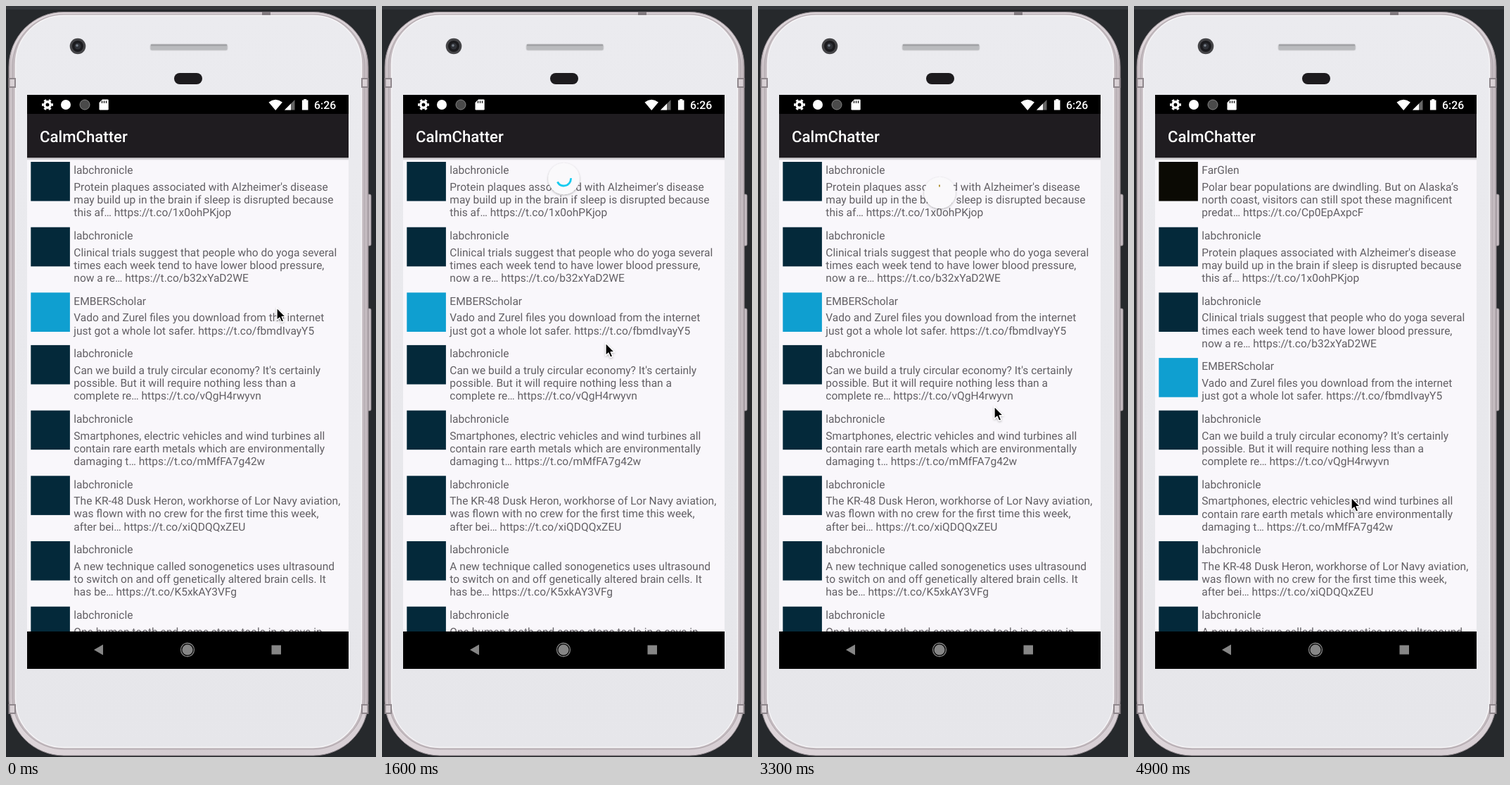
An HTML page that plays this animation: 526x1065 px, repeating every 5 s.

```html
<!DOCTYPE html>
<html lang="en">
<head>
<meta charset="utf-8">
<title>CalmChatter</title>
<style>
  html, body { margin: 0; width: 100%; height: 100%; overflow: hidden; background: #26292c; }
  svg { display: block; width: 100%; height: 100%; }
  text { font-family: Roboto, "Liberation Sans", sans-serif; text-rendering: geometricPrecision; white-space: pre; }
  #feed text { font-size: 15.56px; fill: #625f64; }
  .title { font-size: 22.2px; font-weight: 500; fill: #fff; }
  .clock { font-size: 15.8px; font-weight: 500; fill: #fff; }
</style>
</head>
<body>
<svg viewBox="0 0 526 1065" preserveAspectRatio="none">
  <defs>
    <linearGradient id="rim" x2="1" y2="0">
      <stop offset="0" stop-color="#bdb3b8"/>
      <stop offset=".012" stop-color="#ded6da"/>
      <stop offset=".5" stop-color="#d3cbd0"/>
      <stop offset=".988" stop-color="#d8d0d5"/>
      <stop offset="1" stop-color="#b3a9ae"/>
    </linearGradient>
    <linearGradient id="face" x2="0" y2="1">
      <stop offset="0" stop-color="#ebebef"/>
      <stop offset="1" stop-color="#e6e6ea"/>
    </linearGradient>
    <linearGradient id="shade" x2="0" y2="1">
      <stop offset="0" stop-color="#000" stop-opacity=".3"/>
      <stop offset="1" stop-color="#000" stop-opacity="0"/>
    </linearGradient>
    <filter id="soft" x="-30%" y="-30%" width="160%" height="160%">
      <feDropShadow dx="0" dy="1.2" stdDeviation="1.4" flood-opacity=".3"/>
    </filter>
    <clipPath id="view"><rect x="30" y="215" width="457" height="672"/></clipPath>
  </defs>

  <rect width="526" height="1065" fill="#26292c"/>
  <rect width="526" height="5" fill="#35383b"/>

  <!-- phone -->
  <g fill="#c6bdc2" stroke="#8b8488" stroke-width=".8">
    <rect x="511" y="267" width="8" height="73" rx="2"/>
    <rect x="511" y="429" width="8" height="145" rx="2"/>
  </g>
  <rect x="4" y="8.5" width="511" height="1054.5" rx="78" fill="url(#rim)" stroke="#90888d"/>
  <rect x="9" y="12" width="501" height="1042" rx="73" fill="#c3babf" stroke="#a79fa4" stroke-width=".8"/>
  <rect x="13.5" y="13.5" width="492" height="1038" rx="69" fill="url(#face)" stroke="#f6f5f7" stroke-width="1.5"/>
  <rect x="364" y="8" width="12" height="5" fill="#817a7f"/>
  <g fill="#d8d0d4" stroke="#8f878c" stroke-width="2">
    <path d="M4.5 103h8.5v12h-8.5zM506 103h8.5v12h-8.5zM4.5 991h8.5v12h-8.5zM506 991h8.5v12h-8.5z"/>
  </g>
  <circle cx="102" cy="57" r="11.3" fill="#454548"/>
  <circle cx="102" cy="57" r="8" fill="#1b1b1e"/>
  <circle cx="102" cy="57" r="4.5" fill="#303238"/>
  <circle cx="101" cy="56" r="1.8" fill="#77808a"/>
  <rect x="205" y="54" width="110" height="9" rx="2.5" fill="#b9babd" stroke="#d2d2d5"/>
  <rect x="206" y="54.5" width="108" height="2" fill="#9d9ea1"/>
  <rect x="239" y="95" width="40" height="16" rx="8" fill="#1d1b1e"/>

  <!-- screen -->
  <rect x="30" y="126" width="457" height="814"/>
  <rect x="30" y="215" width="457" height="672" fill="#f9f7fb"/>
  <g clip-path="url(#view)">
    <g id="feed"></g>
    <rect x="30" y="215" width="457" height="4" fill="url(#shade)"/>
    <g id="loader">
      <circle r="22.3" fill="#faf9fb" filter="url(#soft)"/>
      <circle id="arc" r="10" fill="none" stroke-width="2.8" pathLength="360"/>
    </g>
  </g>
  <rect x="30" y="153" width="457" height="62" fill="#1f1c20"/>
  <text class="title" x="48" y="193">CalmChatter</text>

  <!-- status bar -->
  <g fill="#fff">
    <circle cx="59" cy="140" r="4.2" fill="none" stroke="#fff" stroke-width="3.4"/>
    <circle cx="59" cy="140" r="6.8" fill="none" stroke="#fff" stroke-width="2.4" pathLength="48" stroke-dasharray="4 4" stroke-dashoffset="2"/>
    <circle cx="85" cy="140" r="7"/>
    <circle cx="112" cy="140" r="7" fill="#4a4a4a" stroke="#858585"/>
    <path d="M137 132.5h7.5q1.2 0 1.2 1.2v12.6q0 1.2-1.2 1.2h-10.8q-1.2 0-1.2-1.2v-9.3z"/>
    <path d="M136.5 134.5v3.2m3-3.2v3.2m3-3.2v3.2" stroke="#000" stroke-width="1.3"/>
    <path d="M373.5 136.5q9.7-7.4 19.4 0l-9.7 11.5z"/>
    <path d="M410.5 133v14.5h-14.5z" fill="#666"/>
    <path d="M405 138.5v9h-9z"/>
    <path d="M423.2 133.5v-1.5h4v1.5h2.3v14h-8.6v-14z"/>
  </g>
  <text class="clock" x="438" y="146">6:26</text>

  <!-- navigation bar -->
  <g fill="#868686">
    <path d="M125 913l13-7.5v15z"/>
    <circle cx="258" cy="913" r="7.6"/>
    <circle cx="258" cy="913" r="9.5" fill="none" stroke="#868686" stroke-width="1.3"/>
    <rect x="377.5" y="906.5" width="13.5" height="13"/>
  </g>

  <g id="cursor">
    <path d="M0 0V17.6L4 13.9L6.7 20.2L9.8 18.9L7.2 12.7H12.6Z" stroke="#fff" stroke-width="1.3" stroke-linejoin="round" filter="url(#soft)"/>
  </g>
</svg>

<script>
const $ = id => document.getElementById(id);
const LAB = ['labchronicle', '#04293a'];
const posts = [
  ['FarGlen', '#0b0a04', 'Polar bear populations are dwindling. But on Alaska’s',
    'north coast, visitors can still spot these magnificent', 'predat… https://t.co/Cp0EpAxpcF'],
  [...LAB, "Protein plaques associated with Alzheimer's disease",
    'may build up in the brain if sleep is disrupted because', 'this af… https://t.co/1x0ohPKjop'],
  [...LAB, 'Clinical trials suggest that people who do yoga several',
    'times each week tend to have lower blood pressure,', 'now a re… https://t.co/b32xYaD2WE'],
  ['EMBERScholar', '#0f9fd0', 'Vado and Zurel files you download from the internet',
    'just got a whole lot safer. https://t.co/fbmdIvayY5'],
  [...LAB, "Can we build a truly circular economy? It's certainly",
    'possible. But it will require nothing less than a', 'complete re… https://t.co/vQgH4rwyvn'],
  [...LAB, 'Smartphones, electric vehicles and wind turbines all',
    'contain rare earth metals which are environmentally', 'damaging t… https://t.co/mMfFA7g42w'],
  [...LAB, 'The KR-48 Dusk Heron, workhorse of Lor Navy aviation,',
    'was flown with no crew for the first time this week,', 'after bei… https://t.co/xiQDQQxZEU'],
  [...LAB, 'A new technique called sonogenetics uses ultrasound',
    'to switch on and off genetically altered brain cells. It', 'has be… https://t.co/K5xkAY3VFg'],
  [...LAB, 'One human tooth and some stone tools in a cave in']
];
const LINE = 18.2, ROW = 92.7;

function add(tag, attrs, label = '') {
  const el = document.createElementNS('http://www.w3.org/2000/svg', tag);
  for (const k in attrs) el.setAttribute(k, attrs[k]);
  el.textContent = label;
  $('feed').append(el);
}

function buildFeed() {
  let y = 221;
  for (const [user, color, ...lines] of posts) {
    add('rect', { x: 35.3, y, width: 55.6, height: 55.6, fill: color });
    add('text', { x: 96.3, y: y + 17.3 }, user);
    lines.forEach((s, i) => add('text', { x: 96.3, y: y + 41 + i * LINE }, s));
    y += ROW - (3 - lines.length) * LINE;
  }
}

// Linear interpolation through [time, value, value...] points.
function track(points, t) {
  const i = points.findIndex(p => p[0] > t);
  if (i < 0) return points[points.length - 1].slice(1);
  if (i === 0) return points[0].slice(1);
  const a = points[i - 1], b = points[i], k = (t - a[0]) / (b[0] - a[0]);
  return a.slice(1).map((v, j) => v + (b[j + 1] - v) * k);
}

const pointer = [
  [0, 385, 428], [200, 368, 398], [400, 338, 346], [600, 325, 320], [900, 325, 324],
  [1200, 320, 366], [1400, 318, 398], [1600, 318, 478], [1800, 330, 583], [2100, 336, 568],
  [3600, 336, 568], [3900, 326, 636], [4200, 316, 691], [4500, 309, 697]
];
const spin = [[1900, 101, 389], [2500, 222, 492], [3300, 622, 632]];
const tint = [[2900, 22, 204, 240], [3300, 168, 134, 28]];
const GRAB = 374, PULL = 71, RELEASE = 1900, LOADED = 3400;

// Pull-to-refresh: offset and arc follow the drag, with tension past the limit.
function pull(y) {
  const drag = Math.max(0, (y - GRAB) / 2);
  const part = Math.min(1, drag / PULL);
  const over = Math.min(2, Math.max(0, drag - PULL) / PULL) / 4;
  const tension = 2 * (over - over * over);
  const grow = Math.max(0, part - 0.4) / 0.6;
  const start = (-0.25 + 0.4 * grow + 2 * tension) * 180;
  return { y: 193 + PULL * (part + 2 * tension), start, end: start + 288 * grow };
}

function loaderState(t, y) {
  if (t < RELEASE) return pull(y);
  const [start, end] = track(spin, t);
  const [cy] = track([[1800, pull(583).y], [2100, 265]], t);
  return { y: cy, start, end };
}

function draw(now) {
  const t = Math.floor(now % 5000 / 100) * 100;
  const [x, y] = track(pointer, t);
  $('cursor').setAttribute('transform', `translate(${x} ${y})`);
  $('feed').setAttribute('transform', `translate(0 ${t < LOADED ? -ROW : 0})`);

  const on = t >= 1200 && t < LOADED;
  $('loader').style.display = on ? '' : 'none';
  if (on) {
    const s = loaderState(t, y), arc = $('arc');
    $('loader').setAttribute('transform', `translate(258.5 ${s.y})`);
    arc.setAttribute('transform', `rotate(${s.start})`);
    arc.setAttribute('stroke-dasharray', `${s.end - s.start} 720`);
    arc.setAttribute('stroke', `rgb(${track(tint, t).map(Math.round)})`);
  }
}

function loop() {
  draw(performance.now());
  requestAnimationFrame(loop);
}
buildFeed();
loop();
</script>
</body>
</html>
```
